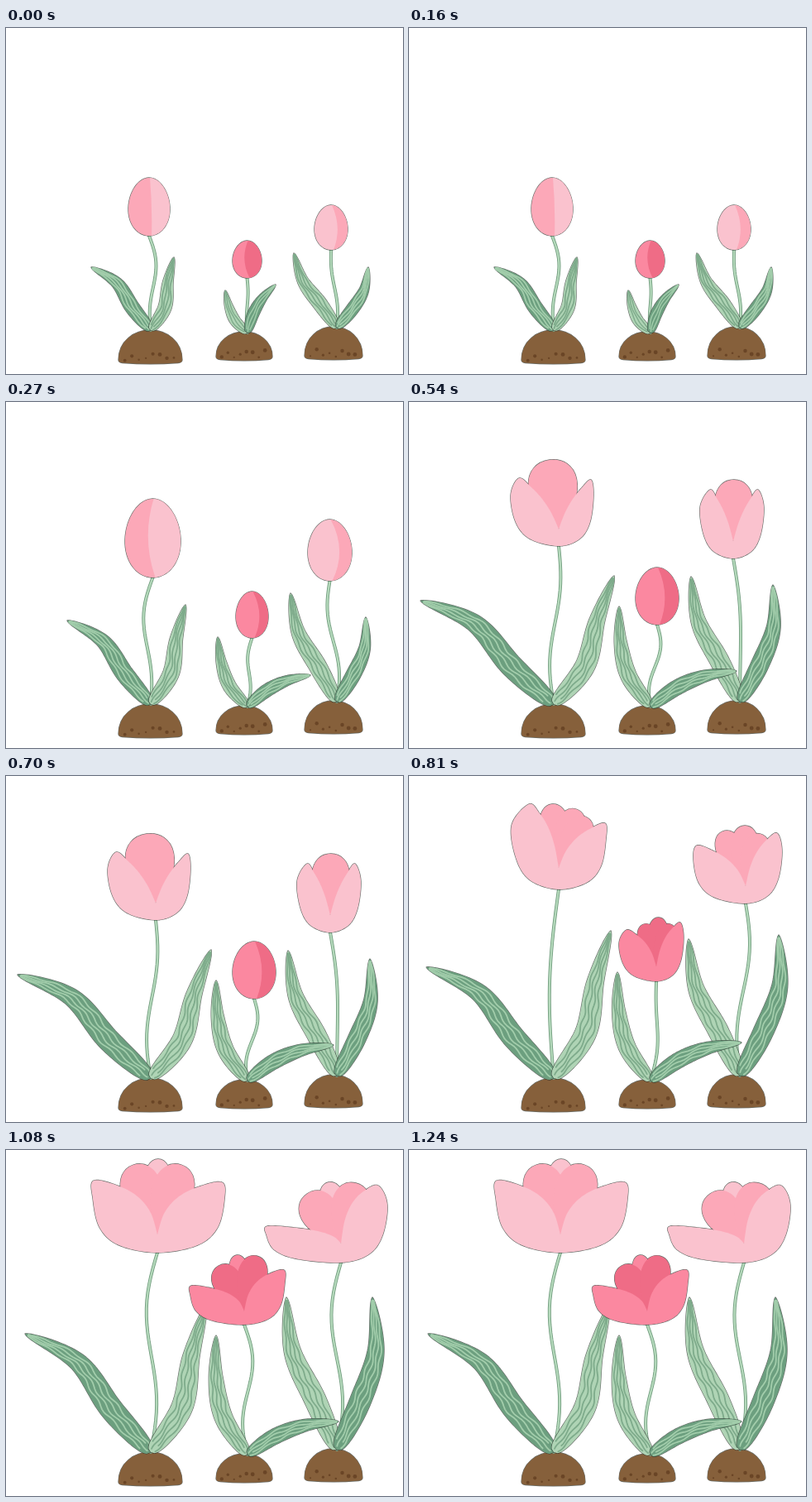
Recreate the animation shown at these times as an HTML page with a canvas. Size 480x418 px, loop 1350 ms.

```html
<!DOCTYPE html>
<html lang="en">
<head>
<meta charset="utf-8">
<title>Tulips</title>
<style>
html, body { margin: 0; width: 100%; height: 100%; overflow: hidden; background: #fff; }
canvas { display: block; width: 480px; height: 418px; }
</style>
</head>
<body>
<canvas id="stage" width="480" height="418"></canvas>
<script>
const ctx = document.getElementById('stage').getContext('2d');
const HOLD = 270, POSES = 5;
const EDGE = 'rgba(40,48,42,.7)';
const PALE = '#fac2ce', PINK = '#fca8b8', ROSE = '#fb88a0', DEEP = '#ef6c86';
const DARK = ['#6c9f7f', '#a2cdab'], LIGHT = ['#afd4b5', '#7eab8b'];

const mix = (a, b, k) => [a[0] + (b[0] - a[0]) * k, a[1] + (b[1] - a[1]) * k];
const dist = (a, b) => Math.hypot(b[0] - a[0], b[1] - a[1]);
const quad = (a, c, b, t) => mix(mix(a, c, t), mix(c, b, t), t);
const off = (p, n, k) => [p[0] + n[0] * k, p[1] + n[1] * k];

// Unit vector to the right of the way from a to b
function normal(a, b) {
  const d = dist(a, b) || 1;
  return [(a[1] - b[1]) / d, (b[0] - a[0]) / d];
}

function random(seed) {
  return () => (seed = (seed * 16807) % 2147483647) / 2147483647;
}

// Catmull-Rom curve as a polyline
function spline(p, steps = 12) {
  const at = i => p[Math.max(0, Math.min(p.length - 1, i))], out = [];
  for (let i = 0; i < p.length - 1; i++) {
    const [a, b, c, d] = [at(i - 1), at(i), at(i + 1), at(i + 2)];
    for (let s = 0; s < steps; s++) {
      const t = s / steps;
      out.push([0, 1].map(k => b[k] + .5 * t * (c[k] - a[k] +
        t * (2 * a[k] - 5 * b[k] + 4 * c[k] - d[k] + t * (3 * (b[k] - c[k]) + d[k] - a[k])))));
    }
  }
  out.push(p[p.length - 1]);
  return out;
}

function trace(line, closed) {
  const path = new Path2D();
  line.forEach(p => path.lineTo(p[0], p[1]));
  if (closed) path.closePath();
  return path;
}

function stroke(path, color, width) {
  ctx.strokeStyle = color;
  ctx.lineWidth = width;
  ctx.stroke(path);
}

function fill(path, color) {
  ctx.fillStyle = color;
  ctx.fill(path);
}

// Outline only around the union of the shapes
function paint(shapes) {
  shapes.forEach(([path]) => stroke(path, EDGE, 1.3));
  shapes.forEach(([path, color]) => fill(path, color));
}

// Egg in a box; a curve through "split" (share of the width) parts its two colours
function bud(l, t, r, b, split) {
  const w = r - l, x = l + w / 2, y = (t + b) / 2, h = b - t;
  return {
    base: [x, b],
    draw({ bud: [left, right] }) {
      const egg = [];
      for (let a = 0; a < 6.28; a += .1) {
        egg.push([x + w / 2 * Math.cos(a) * (1 + .08 * Math.sin(a)), y + h / 2 * Math.sin(a)]);
      }
      const path = trace(egg, true), side = new Path2D();
      paint([[path, left]]);
      ctx.save();
      ctx.clip(path);
      side.moveTo(x + 1, t);
      side.quadraticCurveTo(l + w * (2 * split - .5), y, x + 3, b);
      side.lineTo(r + 5, b);
      side.lineTo(r + 5, t);
      fill(side, right);
      ctx.restore();
    }
  };
}

// Rounded petal growing from a to its peak
function petal(a, peak, width) {
  const n = normal(a, peak), path = new Path2D(), mid = mix(a, peak, .5);
  path.moveTo(...a);
  path.bezierCurveTo(...off(mid, n, -1.5 * width), ...off(peak, n, -1.1 * width), ...peak);
  path.bezierCurveTo(...off(peak, n, 1.1 * width), ...off(mid, n, 1.5 * width), ...a);
  return path;
}

// Two outer petals as a cup from l to r, inner petals and a back petal by their peaks
function bloom(l, r, left, right, base, peaks, back) {
  const high = Math.min(left[1], right[1]);
  const heart = [base[0], base[1] - .25 * (base[1] - high)];
  const inner = (tip, k) => {
    const bend = mix(mix(tip, heart, .5), [heart[0], tip[1]], k);
    return [.25, .5, .75].map(t => quad(tip, bend, heart, t));
  };
  const outer = (tip, x) => [0, .5, 1].map(a => {
    const y = tip[1] + .25 * (base[1] - tip[1]);
    return [base[0] + (x - base[0]) * Math.cos(a) ** .85, y + (base[1] - y) * Math.sin(a) ** .85];
  });
  return {
    base,
    draw({ cup: [front, middle] }, pose) {
      const w = r - l, open = .35 + .22 * (pose - 2);
      const cup = spline([
        heart, ...inner(left, open).reverse(), left, ...outer(left, l), base,
        ...outer(right, r).reverse(), right, ...inner(right, open), heart
      ]);
      const size = w * (peaks.length > 1 ? .16 : .3);
      const shapes = peaks.map(p => [petal(heart, p, size), middle]);
      if (back) shapes.unshift([petal(heart, back, w * .11), front]);
      paint([...shapes, [trace(cup, true), front]]);
    }
  };
}

// Per pose: leaf tips, stem [bow, sway] and flower. A leaf's bend is its
// sideways shift at one and two thirds, as a share of its length.
const plants = [
  {
    bulb: [136, 213, 365, 406], root: [175, 365], bud: [PINK, PALE], cup: [PALE, PINK],
    leaves: [
      { tone: DARK, bend: [.025, .09], tips: [[103, 289], [74, 264], [14, 240], [21, 231], [23, 222]] },
      { tone: LIGHT, bend: [.085, .025], tips: [[203, 277], [217, 245], [248, 210], [244, 187], [242, 188]] }
    ],
    stems: [[5, 4], [-7, -5], [-2, 5], [-8, 0], [-4, -8]],
    flowers: [
      bud(148, 181, 198, 251, .54), bud(144, 117, 211, 212, .4),
      bloom(123, 223, [133, 92], [220, 94], [181, 174], [[170, 70]]),
      bloom(124, 238, [145, 34], [237, 57], [181, 137], [[173, 34], [202, 40], [215, 50]]),
      bloom(105, 264, [106, 37], [261, 39], [183, 124], [[154, 18], [212, 18]], [184, 11])
    ]
  },
  {
    bulb: [361, 431, 361, 401], root: [400, 362], bud: [PALE, PINK], cup: [PALE, PINK],
    leaves: [
      { tone: LIGHT, bend: [-.03, -.07], tips: [[348, 272], [344, 231], [341, 211], [338, 197], [339, 178]] },
      { tone: DARK, bend: [.075, .1], tips: [[438, 289], [435, 260], [440, 221], [447, 192], [443, 178]] }
    ],
    stems: [[1, -2], [0, -5], [5, 1], [1, 6], [-3, -8]],
    flowers: [
      bud(373, 214, 413, 268, .67), bud(365, 142, 418, 216, .7),
      bloom(352, 429, [364, 106], [422, 106], [392, 189], [[393, 94]]),
      bloom(344, 451, [348, 84], [445, 69], [407, 154], [[379, 67], [406, 60], [425, 70]]),
      bloom(315, 461, [316, 92], [450, 43], [405, 136], [[364, 53], [423, 40]], [390, 39])
    ]
  },
  {
    bulb: [254, 322, 367, 402], root: [292, 368], bud: [ROSE, DEEP], cup: [ROSE, DEEP],
    leaves: [
      { tone: LIGHT, bend: [-.11, -.09], tips: [[265, 317], [256, 284], [254, 247], [252, 237], [254, 224]] },
      { tone: DARK, bend: [-.08, -.08], tips: [[326, 310], [368, 330], [396, 325], [402, 322], [402, 328]] }
    ],
    stems: [[0, 1], [-1, -3], [2, 5], [5, -2], [3, 7]],
    flowers: [
      bud(274, 257, 309, 302, .38), bud(278, 229, 317, 285, .7), bud(274, 200, 326, 269, .66),
      bloom(254, 332, [263, 186], [328, 177], [299, 248], [[284, 179], [302, 171], [316, 179]]),
      bloom(223, 337, [224, 164], [336, 145], [288, 211], [[257, 140], [303, 128]], [279, 127])
    ]
  }
];

function drawBulb([l, r, top, bottom]) {
  const w = r - l, h = bottom - top, y = bottom - 5, path = new Path2D();
  path.moveTo(l, y);
  path.bezierCurveTo(l, top + h * .32, l + w * .25, top, l + w * .5, top);
  path.bezierCurveTo(l + w * .76, top, r, top + h * .34, r, y);
  path.quadraticCurveTo(r, bottom - 2, r - 5, bottom - 1.5);
  path.quadraticCurveTo(l + w * .5, bottom + 1, l + 5, bottom - 1.5);
  path.quadraticCurveTo(l, bottom - 2, l, y);
  paint([[path, '#86603b']]);
  const rnd = random(l * 31);
  for (let i = 0; i < 8; i++) {
    const dot = new Path2D();
    dot.arc(l + w * (.1 + .11 * i), bottom - 4 - 9 * rnd(), 1 + 1.6 * rnd(), 0, 7);
    fill(dot, '#6a4526');
  }
}

function drawStem(top, root, [bow, sway]) {
  const line = [];
  for (let t = 0; t <= 1.001; t += .04) {
    const [x, y] = mix(top, root, t);
    line.push([x + bow * Math.sin(Math.PI * t) + sway * Math.sin(2 * Math.PI * t), y]);
  }
  stroke(trace(line), '#6f9a7c', 4);
  stroke(trace(line), '#b3d8ba', 2.4);
}

function drawLeaf(root, tip, [b1, b2], [body, vein]) {
  const len = dist(root, tip), side = normal(root, tip);
  const mid = spline([root, off(mix(root, tip, 1 / 3), side, b1 * len),
    off(mix(root, tip, 2 / 3), side, b2 * len), tip], 20);
  const last = mid.length - 1, full = 4.3 + .06 * len;
  // k runs from -1 on the left edge to 1 on the right edge
  const at = (i, k) => {
    const t = i / last, n = normal(mid[Math.max(0, i - 1)], mid[Math.min(last, i + 1)]);
    return off(mid[i], n, k * full * 1.85 * t ** .45 * (1 - t) ** .8);
  };
  const edge = k => mid.map((p, i) => at(i, k));
  paint([[trace([...edge(-1), ...edge(1).reverse()], true), body]]);
  const count = len < 75 ? 3 : 4;
  for (let j = 1; j <= count; j++) {
    const line = [];
    for (let i = 2 + j % 2 * 3; i < last - 1; i++) {
      line.push(at(i, 2 * j / (count + 1) - 1 + .1 * Math.sin(i / last * len / 4.6 + j * 1.3)));
    }
    stroke(trace(line), vein, len < 75 ? 1.4 : 1.8);
  }
}

function drawPlant(plant, pose) {
  const flower = plant.flowers[pose];
  drawBulb(plant.bulb);
  drawStem(flower.base, plant.root, plant.stems[pose]);
  for (const { tips, bend, tone } of plant.leaves) drawLeaf(plant.root, tips[pose], bend, tone);
  flower.draw(plant, pose);
}

let shown = -1;
function tick() {
  const pose = Math.floor(performance.now() / HOLD) % POSES;
  if (pose !== shown) {
    shown = pose;
    ctx.fillStyle = '#fff';
    ctx.fillRect(0, 0, 480, 418);
    ctx.lineJoin = ctx.lineCap = 'round';
    plants.forEach(plant => drawPlant(plant, pose));
  }
  requestAnimationFrame(tick);
}
tick();
</script>
</body>
</html>
```
